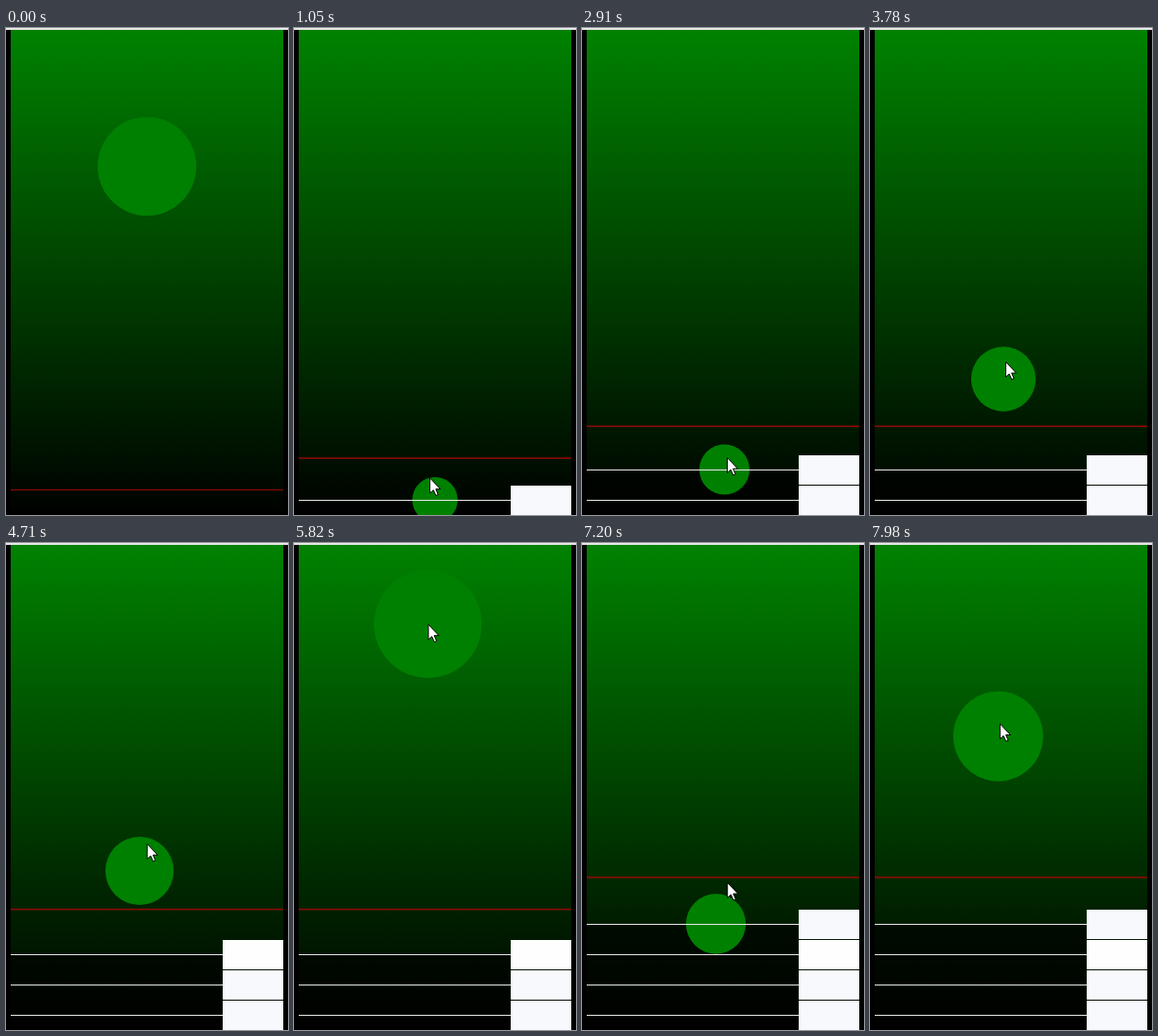
These frames come from a looping animation (298 px wide and 514 px high, 8 s). An HTML page:

```html
<!DOCTYPE html>
<html lang="en">
<head>
<meta charset="utf-8">
<title>Ball drop</title>
<style>
  html, body { margin: 0; width: 100%; height: 100%; overflow: hidden; background: #000; }
  svg { display: block; width: 100vw; height: 100vh; }
</style>
</head>
<body>
<svg viewBox="0 0 298 514">
  <defs>
    <linearGradient id="sky" x1="0" y1="0" x2="0" y2="1">
      <stop offset="0" stop-color="#008200"/>
      <stop offset="1" stop-color="#000200"/>
    </linearGradient>
  </defs>
  <rect width="298" height="514"/>
  <rect x="5" y="1" width="288" height="509" fill="url(#sky)"/>
  <rect width="298" height="2" fill="#e8e8e8"/>
  <g id="shades"></g>
  <rect id="limit" x="5" width="288" fill="#960a06"/>
  <circle id="ball" fill="#008000"/>
  <g id="rows"></g>
  <path id="cursor" d="M.5 .5V16.5L4.2 13.2L6.8 19L9.2 18L6.7 12.2H11.6Z" fill="#fff" stroke="#000"/>
</svg>
<script>
const LOOP = 8000, FLOOR = 498, ROW = 32;
const PULL = 460, LEAD = 22, BOUNCE = 0.365;
const LIMIT_TIME = 300, ROW_DELAY = 240, CURSOR_IN = 840;

// Each round: grab the ball, pull it to `hold`, release it, park the pointer at `wait`
const rounds = [
  { grab: -500, release: 10, park: 1153, hold: [149, 146], wait: [143, 482] },
  { grab: 1470, release: 2005, park: 2880, hold: [150.5, 351.5], wait: [153, 453] },
  { grab: 3090, release: 3593, park: 4290, hold: [141, 336], wait: [152, 425] },
  { grab: 4560, release: 6196, park: 7500, hold: [141.5, 85.5], wait: [155, 400] },
  { grab: 7650, release: Infinity, hold: [134, 157] }
];

const el = id => document.getElementById(id);
const clamp = v => Math.min(1, Math.max(0, v));
const ease = v => (v = clamp(v), v * v * (3 - 2 * v));
const mix = (a, b, u) => a.map((v, i) => v + (b[i] - v) * u);

function set(node, attrs) {
  for (const k in attrs) node.setAttribute(k, attrs[k]);
}

function addRect(parent, x, y, width, height, fill, opacity = 1) {
  const rect = document.createElementNS('http://www.w3.org/2000/svg', 'rect');
  set(rect, { x, y, width, height, fill, opacity });
  el(parent).append(rect);
  return rect;
}

rounds.forEach((r, i) => {
  const rest = FLOOR - ROW * i, prev = rounds[i - 1];
  r.rest = [r.hold[0], rest];
  r.from = prev ? prev.rest : r.hold;
  r.pointerFrom = prev ? prev.wait : r.hold;
  r.fall = 32 * Math.sqrt(rest - r.hold[1]);
  r.land = r.release + r.fall;
  r.parts = [
    addRect('shades', 5, rest, 224, ROW, '#000', 0.6),
    addRect('rows', 5, rest, 224, 1, '#e8ece8'),
    addRect('rows', 229, rest - 15, 64, ROW - 1, i === 2 ? '#fefefe' : '#f8f9fd')
  ];
});

// Gravity, then a single bounce; 0 at the hold point, 1 at rest
function dropped(r, s) {
  if (s < r.fall) return (s / r.fall) ** 2;
  const u = clamp((s - r.fall) / (2 * BOUNCE * r.fall));
  return 1 - BOUNCE ** 2 * 4 * u * (1 - u);
}

function ballAt(r, t) {
  return t < r.release
    ? mix(r.from, r.hold, ease((t - r.grab) / PULL))
    : mix(r.hold, r.rest, dropped(r, t - r.release));
}

function pointerAt(r, t) {
  return t < r.release
    ? mix(r.pointerFrom, r.hold, ease((t + LEAD - r.grab) / PULL))
    : mix(r.hold, r.wait, ease((t - r.release) / (r.park - r.release)));
}

function draw(t) {
  const round = rounds.filter(r => r.grab <= t).pop();
  const [x, y] = ballAt(round, t);
  set(el('ball'), { cx: x, cy: y, r: 63.8 - 0.08 * y });

  let level = 0;
  for (const r of rounds) {
    level += ease((t - r.land) / LIMIT_TIME);
    const visibility = t >= r.land + ROW_DELAY ? 'visible' : 'hidden';
    r.parts.forEach(p => set(p, { visibility }));
  }
  set(el('limit'), { y: 487 - 33.7 * level, height: 1 + 0.5 * clamp(level) });

  const [px, py] = pointerAt(round, t);
  set(el('cursor'), {
    transform: `translate(${px} ${py})`,
    visibility: t >= CURSOR_IN ? 'visible' : 'hidden'
  });
}

const start = performance.now();
function tick() {
  draw((performance.now() - start) % LOOP);
  requestAnimationFrame(tick);
}
tick();
</script>
</body>
</html>
```
